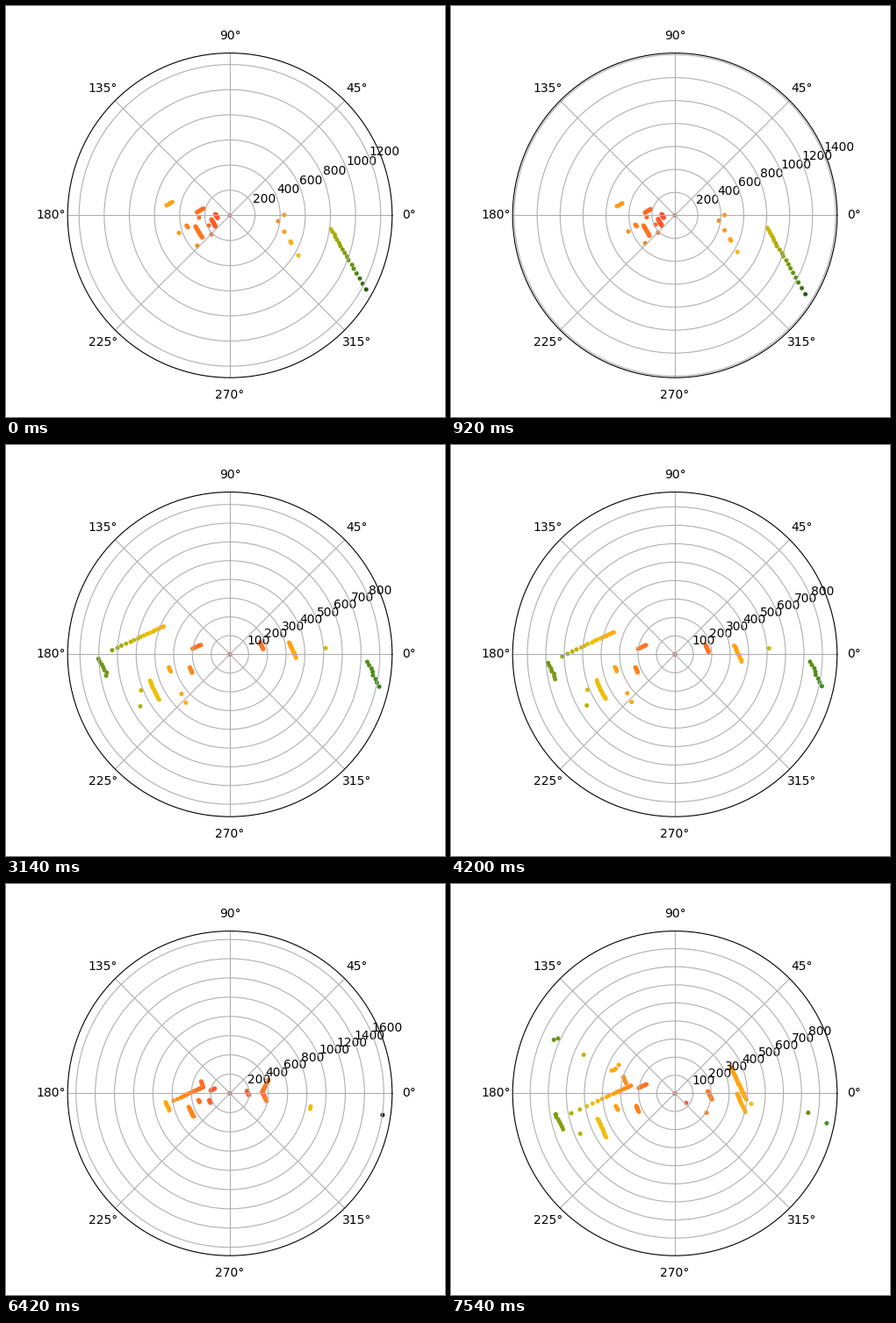
Write a matplotlib script that moves like this. It is 500 by 468 pixels and loops after 8000 ms.

```python
import numpy as np
import matplotlib.pyplot as plt
from matplotlib.animation import FuncAnimation
from matplotlib.colors import LinearSegmentedColormap

W, H, DPI = 500, 468, 100
CX, CY, RADIUS = 255, 238.4, 184.8
STEP_MS, LOOP_MS = 40, 8000
RAY_GAP = 1.3                  # degrees between lidar rays
DRIFT = np.array([14, 33])     # sensor travel per scan, along the long walls
GREEN, PINE, BLACK = "#3a8820", "#205c10", "#181c18"

# Distances are in mm from the sensor: x to the right, y down.
rng = np.random.default_rng(4)


def wall(x, y, span, heading):
    """Points where rays meet a straight wall, from (x, y) along the heading."""
    h = np.radians(heading)
    offset = x * np.sin(h) - y * np.cos(h)
    sweep = np.radians(np.arange(0, span + .1, RAY_GAP))
    a = np.arctan2(y, x) + np.sign(offset) * sweep
    r = offset / np.sin(h - a) * rng.normal(1, .004, a.size)
    return np.column_stack([r * np.cos(a), r * np.sin(a)])


def cluster(x, y, spread, count):
    return rng.normal((x, y), spread, (count, 2))


def scene(down, across, strays, tilt=65):
    """A rectangular room: walls along the tilt, walls at right angles, strays."""
    return np.vstack([[(0, 0)], strays,
                      *[wall(*w, tilt) for w in down],
                      *[wall(*w, tilt - 90) for w in across]])


def corridor(reach):
    down = [(804, 109, reach), (-273, 88, 21), (-147, 32, 26),
            (-115, -10, 18), (-343, 81, 3)]
    across = [(-503, -80, 4), (-262, -24, 10)]
    strays = [(384, 46), (433, -3), (433, 130), (482, 208), (489, 220),
              (545, 319), (-245, 18), (-168, 81), (-147, 151), (-259, 242),
              (-405, 140)]
    return scene(down, across, strays, 60)


def landing():
    down = [(-349, 16, 14), (-291, 132, 12), (-345, 244, 14), (-582, 177, 7),
            (-134, 164, 11), (371, 21, 8), (685, -60, 9)]
    across = [(-309, -6, 4), (-541, -55, 5)]
    strays = [(-233, -51), (-246, 231), (-224, 276), (-264, 106), (157, -29),
              (351, -20), (506, -55), (779, 110), (-434, 0), (-345, 8)]
    return scene(down, across, np.vstack([strays, cluster(-330, 218, 25, 4)]))


def room(k, *extras):
    """The room after k steps of sensor travel; some walls slide only partly."""
    def moved(x, y, span, share):
        dx, dy = share * k * DRIFT
        return x + dx, y + dy, span

    down = [moved(-678, 70, 8, .7), moved(-427, 141, 15, 0),
            moved(172, -38, 14, .4), moved(330, -30, 15, .5),
            moved(-214, 70, 8, 0), moved(-325, 70, 5, 0)]
    across = [moved(-599, 44, 22, 1), moved(-200, -30, 10, 0)]
    return np.vstack([scene(down, across, [(-400, 200)][:0] or [(0, 0)]), *extras])


def scan(start, rmax, xy, far):
    x, y = xy.T
    r = np.hypot(x, y)
    ramp = LinearSegmentedColormap.from_list("range", [
        (0, "#ff4038"), (.1, "#ff5a2c"), (.2, "#ff7422"), (.32, "#ff9218"),
        (.43, "#ffb010"), (.52, "#ecc008"), (.64, "#b4b00a"),
        (.74, "#829c10"), (.84, "#5a9014"), (.95, far), (1, far)])
    return start, rmax, np.column_stack([np.arctan2(-y, x), r]), ramp(r / rmax)


far_wall = wall(735, 40, 10, 65)
side_strays = [(-474, 192), (-478, 277), (-258, 211), (-235, 258), (511, -33)]
corner = wall(-300, -125, 6, 65)
door = wall(340, -22, 16, -62)
hall_strays = np.vstack([cluster(820, 145, 50, 5), cluster(1230, 310, 60, 5),
                         [(922, 317), (1172, 141), (1533, 244)]])
floor_strays = [(-504, -213), (-310, -157), (-660, 116), (-523, 223), (-199, 102),
                (63, 53), (175, 107), (737, 107), (839, 165), (422, 58)]

SCANS = [
    scan(0, 1291, corridor(21), PINE),
    scan(920, 1414, corridor(24), PINE),
    scan(2000, 827, landing(), GREEN),
    scan(3140, 866, room(-2, far_wall, side_strays), GREEN),
    scan(4200, 880, room(-1, far_wall, side_strays), GREEN),
    scan(5210, 1627, room(0, corner, door, hall_strays), BLACK),
    scan(6420, 1687, room(1, corner, door, [(840, 135), (835, 161), (1588, 225)]),
         BLACK),
    scan(7540, 897, room(2, corner + DRIFT, wall(310, -145, 31, 65),
                         wall(-669, -296, 2.5, -25), wall(-349, -126, 3, -25),
                         floor_strays), "#4a9020"),
]
STARTS = [s[0] for s in SCANS]

fig = plt.figure(figsize=(W / DPI, H / DPI), dpi=DPI, facecolor="white")
ax = fig.add_axes([(CX - RADIUS) / W, 1 - (CY + RADIUS) / H,
                   2 * RADIUS / W, 2 * RADIUS / H], projection="polar")
dots = ax.scatter([0], [0], s=13, lw=0)


def update(i):
    # Each tick shows the scan that begins within it.
    now = i * STEP_MS + STEP_MS - 10
    _, rmax, offsets, colors = SCANS[np.searchsorted(STARTS, now, "right") - 1]
    step = 100 if rmax < 1000 else 200
    dots.set_offsets(offsets)
    dots.set_facecolor(colors)
    ax.set_rgrids(np.arange(step, rmax, step))
    ax.set_ylim(0, rmax)
    return dots,


anim = FuncAnimation(fig, update, frames=LOOP_MS // STEP_MS, interval=STEP_MS,
                     init_func=lambda: update(0), repeat=True, repeat_delay=0)
plt.show()
```
